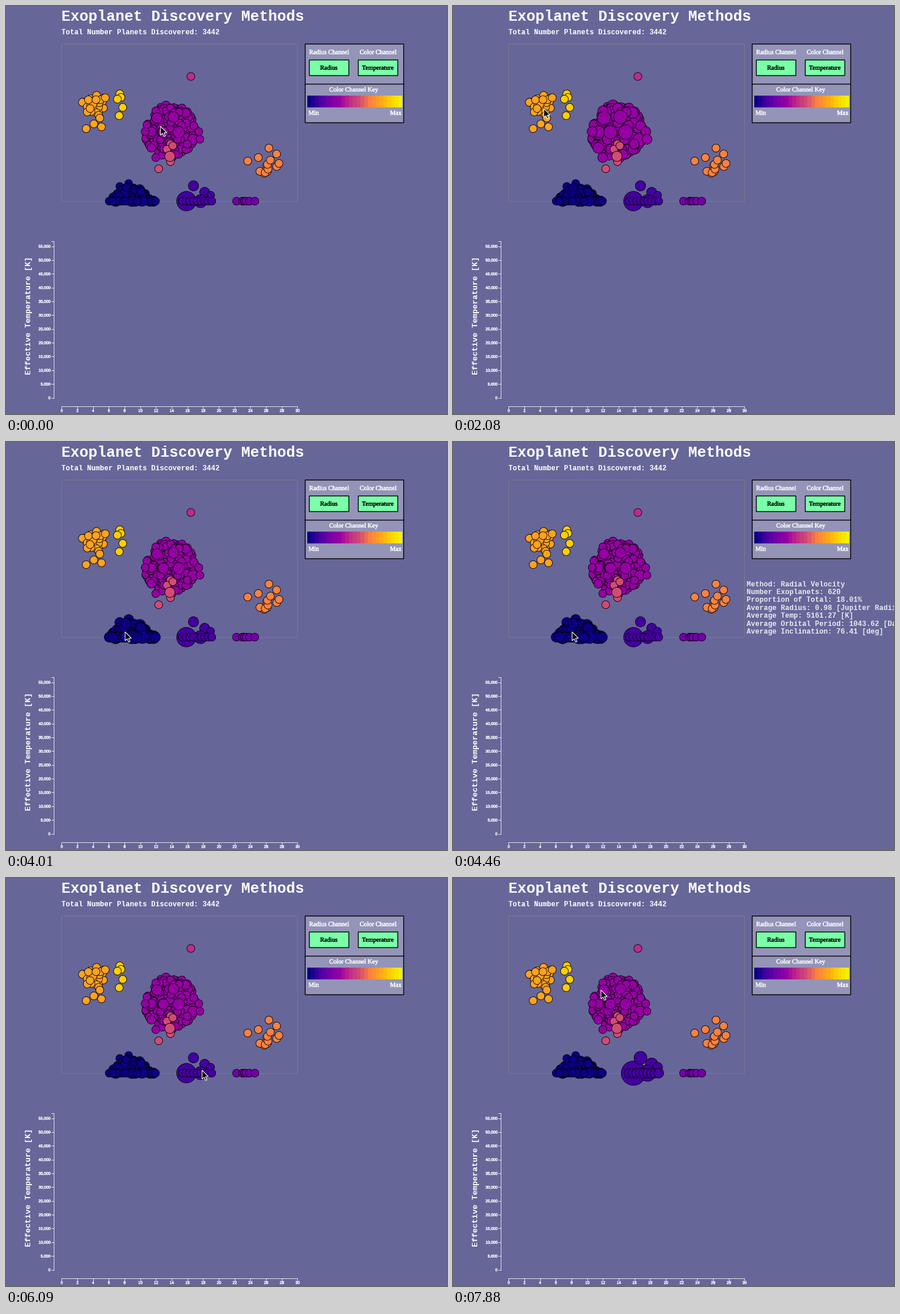
A matplotlib script for the animation above (8000 ms loop, 748 px wide and 692 px high).

```python
import numpy as np
import matplotlib.pyplot as plt
from matplotlib.animation import FuncAnimation
from matplotlib.colors import LinearSegmentedColormap
from matplotlib.patches import Polygon, Rectangle
from matplotlib.patheffects import withStroke

W, H = 748, 692
DPI = 64                 # power of two keeps the pixel size exact
PT = 72 / DPI            # points per pixel
FRAMES, LOOP = 54, 8000
BG = "#666699"
MONO, SANS, SERIF = "Liberation Mono", "Liberation Sans", "Liberation Serif"
PALETTE = ["#0b0085", "#4400a0", "#7300a9", "#9500a3", "#c12a88",
           "#d14c74", "#f9813f", "#ffa21f", "#ffce00", "#f3f200"]
RADIUS, GROWTH = 6.67, 0.25
FLOOR = 331

fig = plt.figure(figsize=(W / DPI, H / DPI), dpi=DPI, facecolor=BG)
ax = fig.add_axes([0, 0, 1, 1])
ax.set_xlim(0, W)
ax.set_ylim(H, 0)
ax.axis("off")
rng = np.random.default_rng(12)


def label(x, y, s, px, font=MONO, color="white", **kw):
    text = ax.text(x, y, s, fontsize=px * PT, family=font, color=color, **kw)
    if font != MONO:     # small type gets slightly fuller strokes
        text.set_path_effects([withStroke(linewidth=0.35 * PT, foreground=color)])
    return text


def line(x0, y0, x1, y1, color="white", px=0.8):
    ax.plot([x0, x1], [y0, y1], color=color, lw=px * PT, zorder=1)


def box(x0, y0, x1, y1, fill="none", edge="black", px=1.4):
    ax.add_patch(Rectangle((x0, y0), x1 - x0, y1 - y0, facecolor=fill,
                           edgecolor=edge, lw=px * PT, zorder=1, snap=False))


# --- headings, chart frame and axes ---

def draw_headings():
    label(94, 25, "Exoplanet Discovery Methods", 25.33, weight="bold")
    label(94, 48, "Total Number Planets Discovered: 3442", 12, weight="bold")
    label(42, 525, "Effective Temperature [K]", 13.33, weight="bold",
          rotation=90, rotation_mode="anchor", ha="center")


def draw_axes():
    box(94.5, 64.5, 494.5, 331.5, edge="#808080", px=0.8)
    line(81.5, 398.5, 81.5, 664.5)
    line(77.5, 398.5, 81.5, 398.5)
    for i in range(12):
        y = 664.5 - 23.36 * i
        line(77.5, y, 81.5, y)
        label(75.3, y + 2.4, f"{5000 * i:,}", 6.67, SANS, ha="right")
    line(94.5, 678.5, 494.5, 678.5)
    for i in range(16):
        x = 94.5 + 400 / 15 * i
        line(x, 678.5, x, 682.5)
        label(x, 688.5, str(2 * i), 6.67, SANS, ha="center")


# --- control panel ---

def draw_panel():
    size = 10.67
    box(507.5, 64.5, 674.5, 198, fill="#9494b8")
    line(507.5, 131.5, 674.5, 131.5, "black", 1.4)
    for x, head, name in ((514.5, "Radius Channel", "Radius"),
                          (597.5, "Color Channel", "Temperature")):
        label(x + 33.5, 81.5, head, size, SERIF, ha="center")
        box(x, 91.5, x + 67, 118, fill="#7affa8")
        label(x + 33, 108, name, size, SERIF, "black", ha="center")
    label(589.5, 145, "Color Channel Key", size, SERIF, ha="center")
    label(513, 184.5, "Min", size, SERIF)
    label(671, 184.5, "Max", size, SERIF, ha="right")
    ramp = LinearSegmentedColormap.from_list("key", PALETTE)
    edges = np.linspace(511, 672, 26)
    for i, x in enumerate(edges[:-1]):
        ax.add_patch(Rectangle((x, 151.5), edges[1] - edges[0], 20,
                               facecolor=ramp(i / 24), lw=0, zorder=2))


# --- planets: rows of x, y, radius ---

def rows(x, y, r=RADIUS):
    return np.column_stack(np.broadcast_arrays(x, y, r)).astype(float)


def mixed_radii(n, share=0.1, largest=9):
    big = rng.random(n) < share
    return np.where(big, rng.uniform(7.3, largest, n), RADIUS)


def cloud(n, cx, cy, sx, sy):
    """Soft round cluster, cut off at two deviations."""
    angle = rng.uniform(0, 2 * np.pi, n)
    dist = 2 * rng.random(n) ** 0.7
    return rows(cx + sx * dist * np.cos(angle), cy + sy * dist * np.sin(angle))


def transit():
    blob = cloud(340, 279, 212, 21.5, 22)
    blob[:, 2] = mixed_radii(len(blob))
    strays = rows([327, 329, 254, 236], [213, 226, 257, 213])
    large = rows([256, 284, 267, 293], [190, 188, 214, 214], [9, 9, 9, 9.8])
    return np.vstack([blob, strays, large])


def radial_velocity():
    x = rng.uniform(180, 246, 70)
    mound = 25 * (1 - ((x - 211) / 38) ** 2)
    pile = rows(x, FLOOR - mound * rng.random(70), mixed_radii(70))
    peaks = rows([208, 193], [301, 306])
    ground = rows(rng.permutation(np.linspace(175, 253.5, 44)), FLOOR,
                  mixed_radii(44))
    return np.vstack([peaks, pile, ground])


def imaging():
    large = rows([306, 318, 337, 330], [FLOOR, 305, 316, FLOOR],
                 [16.5, 8.7, 8.5, 11])
    ground = rows(np.linspace(299, 349, 9), FLOOR)
    return np.vstack([large, rows(347, 321), ground])


def microlensing():
    low = rows([159, 149, 162, 136], [190, 200, 205, 208])
    return np.vstack([cloud(30, 151, 167, 11, 10), low])


def areas(r):
    return (2 * r * PT) ** 2


def scatter(planets, hue):
    return ax.scatter(planets[:, 0], planets[:, 1], s=areas(planets[:, 2]),
                      c=PALETTE[hue], edgecolors="black",
                      linewidths=0.85 * PT, zorder=3 + hue)


def draw_minor_methods():
    scatter(rows([391, 401, 404, 407, 413, 422], FLOOR), 2)
    scatter(rows(313, 119), 4)
    scatter(rows([279, 273, 283, 279, 278, 259], [234, 243, 237, 264, 255, 276],
                 [RADIUS] * 4 + [8.7, RADIUS]), 5)
    scatter(np.vstack([cloud(11, 438, 272, 11, 9),
                       rows([446, 459, 410, 463], [241, 251, 263, 267])]), 6)
    scatter(rows([193, 195, 189, 198, 192], [149, 155, 158, 172, 186]), 8)


# --- hover behaviour ---

def ease(u):
    """Cubic ease in and out."""
    u = np.clip(u, 0, 1)
    return 4 * u ** 3 if u < 0.5 else 1 - 4 * (1 - u) ** 3


class Group:
    """Planets that grow while hovered, with a summary fading in."""
    STEPS = 3

    def __init__(self, planets, hue, enter, text, leave, settle, lines):
        self.r = planets[:, 2]
        self.dots = scatter(planets, hue)
        self.enter, self.text, self.leave, self.settle = enter, text, leave, settle
        self.lines = lines

    def scale(self, k):
        grown = ease((k - self.enter) / self.STEPS)
        shrunk = ease((k - self.settle) / self.STEPS)
        return 1 + GROWTH * (grown - shrunk)

    def alpha(self, k):
        return ease((k - self.text) / self.STEPS) if k < self.leave else 0


def summary(method, count, radius, temp, period, tilt):
    return [f"Method: {method}", f"Number Exoplanets: {count}",
            f"Proportion of Total: {100 * count / 3442:.2f}%",
            f"Average Radius: {radius} [Jupiter Radii]",
            f"Average Temp: {temp:.2f} [K]",
            f"Average Orbital Period: {period:.2f} [Days]",
            f"Average Inclination: {tilt:.2f} [deg]"]


draw_headings()
draw_axes()
draw_panel()
draw_minor_methods()

groups = [
    Group(transit(), 3, 0, 0, 10, 23,
          summary("Transit", 2697, 0.34, 5511.54, 26.78, 87.3)),
    Group(microlensing(), 7, 15, 17, 23, 23,
          summary("Microlensing", 44, "NaN", 5950, 2885.67, 58)),
    Group(radial_velocity(), 0, 24, 28, 34, 35,
          summary("Radial Velocity", 620, 0.98, 5161.27, 1043.62, 76.41)),
    Group(imaging(), 1, 42, 45, 51, FRAMES,
          summary("Imaging", 44, 1.82, 4773.03, 837545.65, 55.02)),
]
tips = [label(498.5, 244.7 + 13.4 * i, "", 12, weight="bold") for i in range(7)]

# --- pointer: start step, end step, destination, upward bow ---
START = (262, 204)
MOVES = [(8, 9, (265, 190), 0), (9, 14, (154, 174), 100),
         (22, 26, (202, 322), 0), (33, 35, (295, 322), 0),
         (35, 42, (333, 326), 0), (50, 53, (251, 190), 0)]
ARROW = np.array([(0, 0), (0, 15), (3.5, 11.9), (6, 17.4), (8.3, 16.4),
                  (5.9, 11), (10.7, 10.9)])
pointer = ax.add_patch(Polygon(ARROW, facecolor="black", edgecolor="white",
                               lw=1.1 * PT, zorder=20))


def pointer_at(k):
    pos = np.array(START, dtype=float)
    for begin, end, goal, bow in MOVES:
        u = np.clip((k - begin) / (end - begin), 0, 1)
        pos += (np.array(goal) - pos) * ease(u)
        pos[1] -= bow * np.sin(np.pi * u)
    return pos


def update(k):
    for tip in tips:
        tip.set_alpha(0)
    for g in groups:
        g.dots.set_sizes(areas(g.r * g.scale(k)))
        alpha = g.alpha(k)
        if alpha > 0:
            for tip, text in zip(tips, g.lines):
                tip.set_text(text)
                tip.set_alpha(float(alpha))
    pointer.set_xy(ARROW + pointer_at(k))
    return [pointer, *tips, *(g.dots for g in groups)]


anim = FuncAnimation(fig, update, frames=FRAMES, interval=LOOP / FRAMES,
                     repeat=True, repeat_delay=0, blit=False)
plt.show()
```
